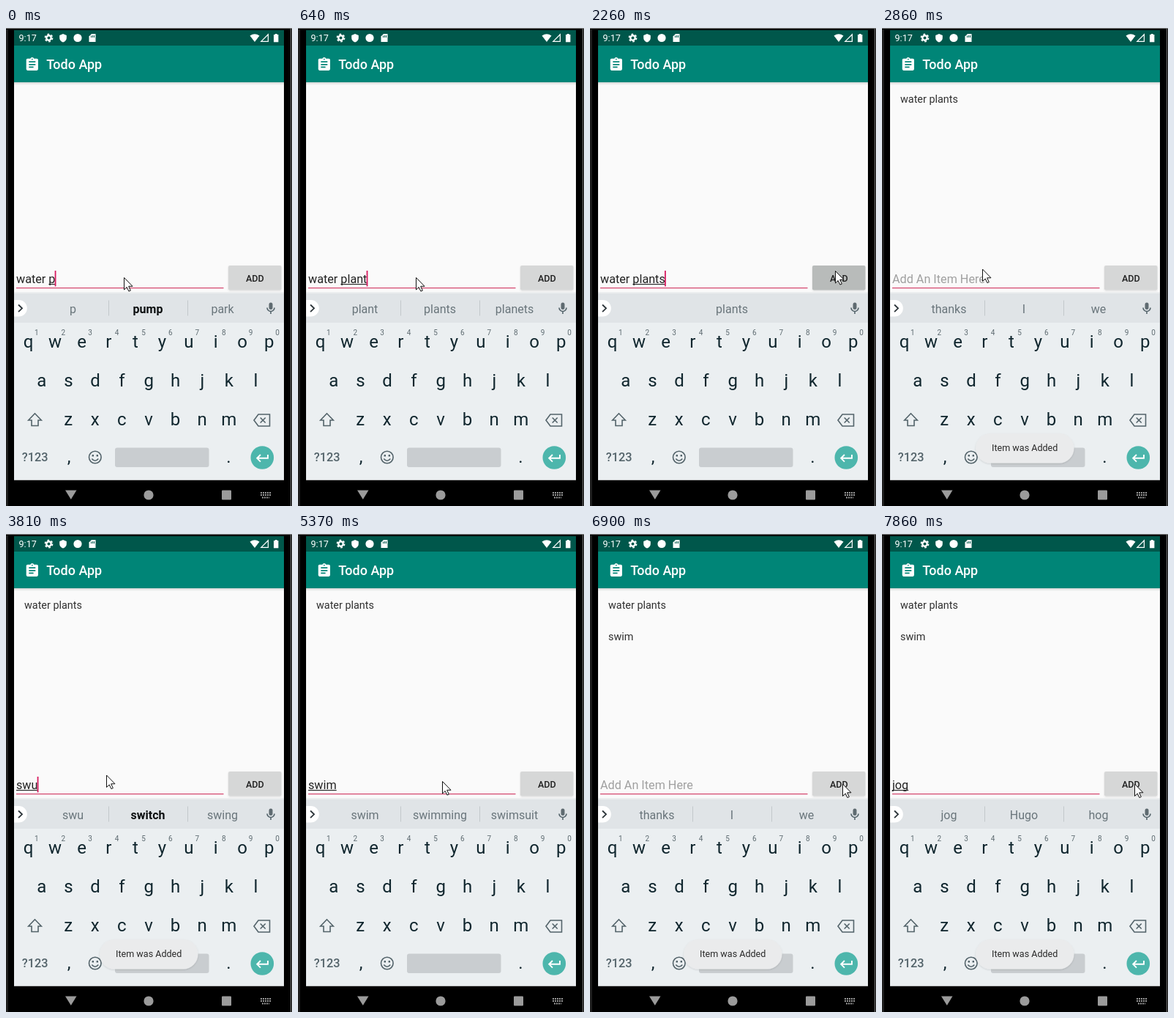
Write an HTML page that moves like this. It is 391 by 652 pixels and loops after 8 s.

```html
<!DOCTYPE html>
<html lang="en">
<head>
<meta charset="utf-8">
<title>Todo App</title>
<style>
  html, body { margin: 0; width: 100%; height: 100%; overflow: hidden; background: #000; }
  svg { display: block; width: 391px; height: 652px; font-family: Roboto, "Noto Sans", sans-serif; }
  text { white-space: pre; }
  .mid { text-anchor: middle; }
  .key { font-size: 24px; fill: #10262e; }
  .digit { font-size: 10px; fill: #5d6a70; }
  .hint { font-size: 16px; fill: #69757b; }
  .field { font-size: 16.2px; }
  .item { font-size: 14.4px; fill: #303030; }
  .line { fill: none; stroke: #53636a; stroke-width: 1.6; }
</style>
</head>
<body>
<svg viewBox="0 0 391 652">
  <defs>
    <linearGradient id="drop" x2="0" y2="1">
      <stop stop-color="#000" stop-opacity=".14"/>
      <stop offset="1" stop-color="#000" stop-opacity="0"/>
    </linearGradient>
    <filter id="soft" x="-10%" y="-20%" width="120%" height="150%">
      <feDropShadow dx="0" dy="1" stdDeviation="1" flood-opacity=".14"/>
    </filter>
  </defs>

  <!-- device and app background -->
  <rect width="391" height="652"/>
  <path d="M1.500 2V652" stroke="#1d1d1d" stroke-width="3"/>
  <path d="M0 .5H391M389.500 0V652" stroke="#777"/>
  <rect x="11" y="3" width="369" height="613.500" fill="#fafafa"/>
  <rect x="11" y="3" width="369" height="21" fill="#00574b"/>
  <rect x="11" y="24" width="369" height="50" fill="#008577"/>
  <rect x="11" y="74" width="369" height="4" fill="url(#drop)"/>

  <!-- status bar -->
  <g fill="#fff">
    <text x="17.5" y="18" font-size="12.6">9:17</text>
    <g fill="none" stroke="#fff">
      <circle cx="58.500" cy="13.500" r="3.200" stroke-width="2.400"/>
      <circle cx="58.500" cy="13.500" r="5" stroke-width="1.800" stroke-dasharray="2.618"/>
    </g>
    <path d="M78 8l4.800 2v3.500q0 4-4.800 6q-4.800-2-4.800-6V10z"/>
    <circle cx="98" cy="13.500" r="5.600"/>
    <path d="M117 8h5.500v11h-9v-7.500z"/>
    <path d="M116.500 10.500v2.500M118.500 10v3M120.500 10v3" stroke="#00574b"/>
    <path d="M333.500 10.500q6.500-4.500 13 0L340 19z"/>
    <path d="M348.800 18.400h9.600V8.800z" fill="none" stroke="#fff" stroke-width="1.200"/>
    <path d="M366 9h1.800V8h2.800v1h1.800v10.300H366z"/>
  </g>

  <!-- app bar -->
  <path transform="translate(25 39) scale(.9)" fill="#fff" d="M19 3h-4.180a3 3 0 0 0-5.640 0H5a2 2 0 0 0-2 2v14a2 2 0 0 0 2 2h14a2 2 0 0 0 2-2V5a2 2 0 0 0-2-2zm-7 0a1 1 0 1 1 0 2a1 1 0 1 1 0-2zm2 14H7v-2h7zm3-4H7v-2h10zm0-4H7V7h10z"/>
  <text x="55.300" y="56.300" font-size="17.950" font-weight="500" fill="#fff">Todo App</text>

  <!-- list -->
  <text id="first" class="item" x="25" y="101.500">water plants</text>
  <text id="second" class="item" x="25" y="144.500">swim</text>

  <!-- entry row -->
  <text id="ghost" class="field" x="14" y="348" fill="#a0a0a0">Add An Item Here</text>
  <text id="entry" class="field" x="14" y="348" fill="#212121"></text>
  <rect id="under" y="349" height="1.100" fill="#212121"/>
  <rect id="caret" y="331" width="1.800" height="21.500" fill="#d81b60"/>
  <path d="M14 354.600H297.500" stroke="#d4476f" stroke-width="1.400"/>
  <rect id="button" x="304" y="324" width="72.500" height="33.500" rx="2" filter="url(#soft)"/>
  <text class="mid" x="340.300" y="345.800" font-size="12.570" font-weight="500" fill="#212121">ADD</text>

  <!-- keyboard -->
  <rect x="11" y="360" width="369" height="3" fill="#eceeef"/>
  <rect x="11" y="362" width="369" height="254.500" fill="#ebeff1"/>
  <rect x="11" y="362" width="369" height="40" fill="#e0e4e7"/>
  <path d="M11 371h6.500a11.300 11.300 0 0 1 0 22.600H11z" fill="#fff"/>
  <path d="M17 377.500l5 4.800l-5 4.800" fill="none" stroke="#2b3338" stroke-width="1.800"/>
  <path id="bars" d="M140.500 371.500V392.500M248.500 371.500V392.500" stroke="#c3c8cb"/>
  <g id="hints"></g>
  <rect x="359.500" y="374.500" width="5" height="9.500" rx="2.500" fill="#5f6b71"/>
  <path class="line" d="M357 381.500a5 5 0 0 0 10 0M362 386.500v3.500" stroke-width="1.400"/>
  <g id="keys"></g>
  <path class="line" d="M39.500 525.800l-8.800 9.200h4.300v7.500h9v-7.500h4.300z"/>
  <path class="line" d="M345 527h15.500v16H345l-6-8zM347.700 531.500l7 7m0-7l-7 7"/>
  <text x="21.800" y="591" font-size="16.300" font-weight="500" fill="#53636a">?123</text>
  <g class="line">
    <circle cx="121.800" cy="585.500" r="8.300"/>
    <path d="M117.300 587.500q4.500 5.500 9 0"/>
  </g>
  <path d="M118.800 582v2.600M124.800 582v2.600" stroke="#53636a" stroke-width="2.400"/>
  <rect x="149" y="572.500" width="128.500" height="26.500" rx="3" fill="#c9cdd0"/>
  <circle cx="350.300" cy="586" r="15.800" fill="#4db6ac"/>
  <path d="M358 582v4.800h-14.500m4.500-4.800l-4.800 4.800l4.800 4.800" fill="none" stroke="#fff" stroke-width="1.900"/>

  <!-- navigation bar -->
  <g fill="#9b9b9b">
    <path d="M81 630.500h15.500L88.800 643z"/>
    <circle cx="195" cy="637" r="6.600"/>
    <rect x="295" y="630.500" width="13" height="13" rx="1"/>
    <path d="M348 634h14m-14 3h14m-12 3.500h10" stroke="#9b9b9b" stroke-width="1.800" stroke-dasharray="2 1"/>
  </g>

  <g id="toast">
    <rect x="128" y="553" width="134.500" height="40.500" rx="20.200" fill="#eaebec" filter="url(#soft)"/>
    <text class="mid" x="195.200" y="577.300" font-size="12.570" fill="#2a2a2a">Item was Added</text>
  </g>
  <path id="mouse" d="M0 0V16.500L3.700 13L6.400 18.600L8.800 17.600L6.200 11.800H11.500Z" fill="#fff" stroke="#111"/>
</svg>
<script>
const LOOP = 8000;
const PITCH = 36.58;
const $ = id => document.getElementById(id);

function addText(parent, cls, x, y, str) {
  const el = document.createElementNS("http://www.w3.org/2000/svg", "text");
  el.setAttribute("class", "mid " + cls);
  el.setAttribute("x", x);
  el.setAttribute("y", y);
  el.textContent = str;
  return parent.appendChild(el);
}

// key caps
[["qwertyuiop", 30.5, 436], ["asdfghjkl", 48.8, 489], ["zxcvbnm", 85.2, 542]].forEach(([row, x, y], r) =>
  [...row].forEach((c, i) => {
    addText($("keys"), "key", x + PITCH * i, y, c);
    if (!r) addText($("keys"), "digit", 41.8 + PITCH * i, 418.5, (i + 1) % 10);
  }));
addText($("keys"), "key", 86, 593, ",");
addText($("keys"), "key", 304.5, 593, ".");
const hints = [91.5, 194, 296].map(x => addText($("hints"), "hint", x, 388.5, ""));

// each track holds [start time, value...] and switches hard
const typed = [[0, "water p"], [120, "water pl"], [370, "water plan"], [640, "water plant"], [790, "water plants"],
  [2270, ""], [3270, "s"], [3690, "sw"], [3810, "swu"], [4390, "sw"], [4530, "swi"], [4670, "swim"],
  [6480, ""], [7030, "j"], [7170, "jo"], [7320, "jog"]];
// a star marks the bold suggestion
const offers = [[0, "p", "*pump", "park"], [120, "pl", "*please", "play"], [370, "plan", "plans", "plane"],
  [640, "plant", "plants", "planets"], [790, "", "plants", ""], [2270, "thanks", "I", "we"],
  [3410, "s", "see", "so"], [3690, "sw", "sweet", "swing"], [3810, "swu", "*switch", "swing"],
  [4390, "sw", "sweet", "swing"], [4530, "swi", "*swim", "swing"], [4670, "swim", "swimming", "swimsuit"],
  [6480, "thanks", "I", "we"], [7030, "j", "just", "job"], [7170, "jo", "*job", "jobs"], [7320, "jog", "Hugo", "hog"]];
const blink = [[0, 1], [1350, 0], [1740, 1], [2700, 0], [3110, 1], [5370, 0], [5780, 1], [6210, 0],
  [6480, 1], [6900, 0], [7030, 1], [7860, 0]];
const pointer = [[0, 161.5, 340.5], [1350, 192, 342], [1480, 250, 338], [1610, 310, 324], [1740, 335.5, 331.5],
  [2540, 300, 338], [2700, 205, 341], [2860, 137.5, 329],
  [5370, 197.5, 337.5], [5500, 246, 344], [5640, 300, 345], [5780, 335, 343], [5930, 345.5, 341]];
const toast = [[0, 0], [2400, .5], [2540, 1], [4390, .5], [4530, 0], [6610, .5], [6750, 1]];
const press = [[0, "#d6d7d7"], [2140, "#b8bbba"], [2270, "#c8caca"], [2400, "#d6d7d7"],
  [6210, "#c8caca"], [6330, "#b8bbba"], [6480, "#c8caca"], [6610, "#d6d7d7"]];

const at = (track, t) => track.findLast(e => e[0] <= t).slice(1);
const show = (id, on) => $(id).setAttribute("opacity", +on);

function draw(now) {
  const t = now % LOOP;
  const [text] = at(typed, t);
  const entry = $("entry");
  entry.textContent = text;
  const width = text ? entry.getComputedTextLength() : 0;
  const start = text.lastIndexOf(" ") + 1;
  const lead = start ? entry.getSubStringLength(0, start) : 0;
  $("under").setAttribute("x", 14 + lead);
  $("under").setAttribute("width", width - lead);
  $("caret").setAttribute("x", 13.2 + width);
  show("caret", at(blink, t)[0]);
  show("ghost", !text);
  show("first", t >= 2270);
  show("second", t >= 6480);
  show("toast", at(toast, t)[0]);

  const words = at(offers, t);
  words.forEach((w, i) => {
    const bold = w[0] === "*";
    hints[i].textContent = bold ? w.slice(1) : w;
    hints[i].style.fontWeight = bold ? 700 : 400;
    hints[i].style.fill = bold ? "#0c0f10" : "";
  });
  show("bars", !!words[0]);
  $("button").setAttribute("fill", at(press, t)[0]);
  $("mouse").setAttribute("transform", `translate(${at(pointer, t)})`);
  requestAnimationFrame(() => draw(performance.now() - begin));
}

const begin = performance.now();
draw(0);
</script>
</body>
</html>
```
